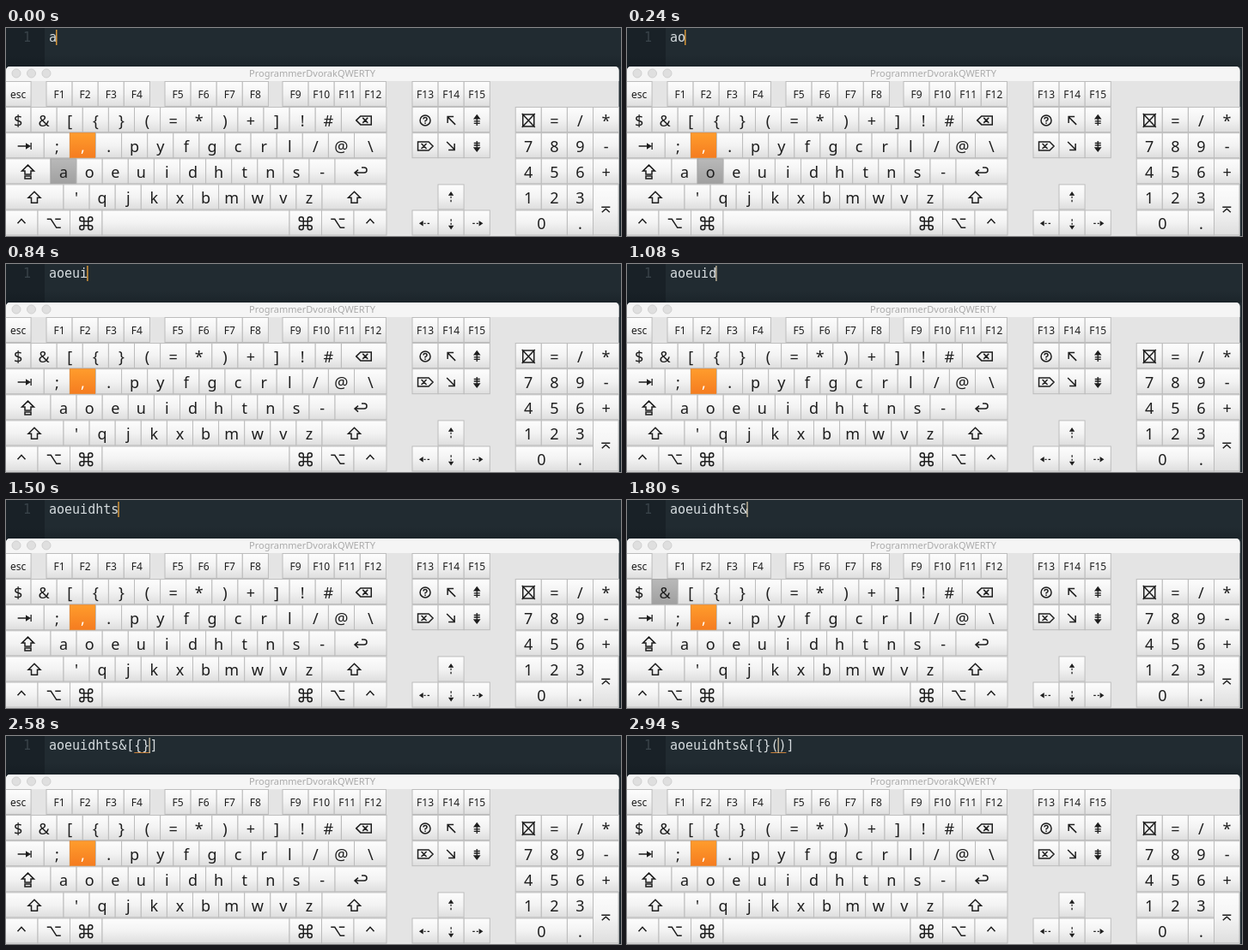
Recreate the animation shown at these times as an HTML page. Size 716x243 px, loop 3000 ms.

```html
<!DOCTYPE html>
<html>
<head>
<meta charset="utf-8">
<style>
html, body { margin: 0; width: 716px; height: 243px; overflow: hidden; background: #212b31; }
svg { display: block; }
text { font-family: "Noto Sans", "Open Sans", sans-serif; }
.code text { font: 15px "DejaVu Sans Mono", monospace; white-space: pre; }
.key rect { fill: url(#cap); stroke: #bcbcbc; stroke-width: 1; }
.key text { font-size: 18px; text-anchor: middle; fill: #1e1e1e; }
.key .small { font-size: 12px; }
.key path { fill: none; stroke: #1e1e1e; stroke-width: 1.5; }
.key .solid { fill: #1e1e1e; stroke-width: 1.3; }
.key.down rect { fill: url(#held); stroke: #a2a2a2; }
.key.dead rect { fill: url(#orange); stroke: #e58a35; }
.key.dead text { fill: #fff; }
</style>
</head>
<body>
<svg width="716" height="243">
  <defs>
    <linearGradient id="cap" x2="0" y2="1"><stop stop-color="#fdfdfd"/><stop offset=".5" stop-color="#f3f3f3"/><stop offset="1" stop-color="#dedede"/></linearGradient>
    <linearGradient id="held" x2="0" y2="1"><stop stop-color="#b9b9b9"/><stop offset="1" stop-color="#a0a0a0"/></linearGradient>
    <linearGradient id="orange" x2="0" y2="1"><stop stop-color="#ff9c2c"/><stop offset="1" stop-color="#f57c20"/></linearGradient>
    <linearGradient id="shade" x2="0" y2="1"><stop stop-color="#10171c" stop-opacity="0"/><stop offset="1" stop-color="#10171c" stop-opacity=".35"/></linearGradient>
  </defs>
  <g class="code">
    <rect width="716" height="243" fill="#212b31"/>
    <rect width="45" height="243" fill="#192127"/>
    <text x="20" y="16" fill="#39434a">1</text>
    <text id="line" x="50" y="16" fill="#d6dcdf"></text>
    <path id="match" stroke="#c8813a"/>
    <rect id="caret" y="2" width="1.3" height="18"/>
    <rect y="32" width="716" height="13" fill="url(#shade)"/>
  </g>
  <path d="M0 243V50Q0 45 5 45H708.5Q713.5 45 713.5 50V243Z" fill="#e4e4e4"/>
  <path d="M0 62V50Q0 45 5 45H708.5Q713.5 45 713.5 50V62Z" fill="#f5f5f5"/>
  <g fill="#dfdfdf" stroke="#d0d0d0"><circle cx="12" cy="53" r="5"/><circle cx="29.5" cy="53" r="5"/><circle cx="47" cy="53" r="5"/></g>
  <text x="356.5" y="57" font-size="11" text-anchor="middle" fill="#aaa">ProgrammerDvorakQWERTY</text>
  <g id="board"></g>
</svg>
<script>
const $ = id => document.getElementById(id);
const PITCH = 30.1, ADVANCE = 15 * 0.602;

// Icon outlines around the centre of a key; a leading * means filled.
const icons = {
  shift: 'M0-7L7 0H3.5V6H-3.5V0H-7Z',
  caps: 'M0-8L7-1H3.5V3H-3.5V-1H-7ZM-3.5 5H3.5V8H-3.5Z',
  back: 'M-9 0L-4-5H8.5V5H-4ZM-1.5-3L4.5 3M4.5-3L-1.5 3',
  del: 'M9 0L4-5H-8.5V5H4ZM1.5-3L-4.5 3M-4.5-3L1.5 3',
  tab: '*M-8 0H3M2-2.5L6 0L2 2.5ZM7.5-4V4',
  ret: 'M-6 1H4Q7 1 7-2T4-5H1M-3-2.5L-7 1L-3 4.5',
  ctrl: 'M-4.5 0L0-5L4.5 0',
  opt: 'M-8-5H-3.5L3 5H8M1.5-5H8',
  cmd: 'M-2.5-5V5A2.5 2.5 0 1 1-5 2.5H5A2.5 2.5 0 1 1 2.5 5V-5A2.5 2.5 0 1 1 5-2.5H-5A2.5 2.5 0 1 1-2.5-5Z',
  help: 'M6 0A6 6 0 1 1-6 0A6 6 0 1 1 6 0M-2-1.5Q-2-3.5 0-3.5T2-1.5Q2-.5 0 .8V1.5M0 2.7V4',
  home: 'M5 5L-4-4M-4 3V-4.5H3',
  end: 'M-5-5L4 4M4-3V4.5H-3',
  pgup: '*M0 6V-2M-3-2L0-6L3-2ZM-3.5 1H3.5M-3.5 3.5H3.5',
  pgdn: '*M0-6V2M-3 2L0 6L3 2ZM-3.5-1H3.5M-3.5-3.5H3.5',
  up: '*M-2-3L0-6L2-3ZM0-1.5V.5M0 2.5V5',
  down: '*M-2 3L0 6L2 3ZM0 1.5V-.5M0-2.5V-5',
  left: '*M-3-2L-6 0L-3 2ZM-1.5 0H.5M2.5 0H5',
  right: '*M3-2L6 0L3 2ZM1.5 0H-.5M-2.5 0H-5',
  clear: 'M-6.5-7H6.5V7H-6.5ZM-7.5-8L7.5 8M7.5-8L-7.5 8',
  enter: 'M-5-4H5M-4.5 2L0-2L4.5 2'
};

function add(parent, tag, attrs, text = '') {
  const node = document.createElementNS('http://www.w3.org/2000/svg', tag);
  for (const name in attrs) node.setAttribute(name, attrs[name]);
  node.textContent = text;
  return parent.appendChild(node);
}

const keys = {};
function key(label, row, x, width = PITCH, height = 29) {
  const y = 62.5 + 30.1 * row, cx = x + width / 2, cy = y + height / 2 + 0.8;
  const group = add($('board'), 'g', { class: 'key' });
  add(group, 'rect', { x, y, width, height });
  if (icons[label]) {
    const solid = label in icons && icons[label][0] === '*';
    add(group, 'path', {
      d: icons[label].replace('*', ''), class: solid ? 'solid' : '',
      transform: `translate(${cx} ${cy})`
    });
  } else {
    const small = row === 0;
    add(group, 'text', { x: cx, y: y + (small ? 19 : 22), class: small ? 'small' : '' }, label);
  }
  keys[label] ??= group;
}

function run(labels, row, x) {
  labels.split(' ').forEach((label, i) => key(label, row, x + i * PITCH));
}

run('esc', 0, -1);
run('F1 F2 F3 F4', 0, 47);
run('F5 F6 F7 F8', 0, 185);
run('F9 F10 F11 F12', 0, 322);
run('F13 F14 F15', 0, 473);

run('$ & [ { } ( = * ) + ] ! #', 1, -1);
key('back', 1, 390.5, 52.5);
key('tab', 2, -1, 45.3);
run('; , . p y f g c r l / @', 2, 44.3);
key('\\', 2, 405.5, 37.5);
key('caps', 3, -1, 53);
run('a o e u i d h t n s -', 3, 52);
key('ret', 3, 383, 60);
key('shift', 4, -1, 68);
run("' q j k x b m w v z", 4, 67);
key('shift', 4, 368, 75);
const bottom = ['ctrl', 'opt', 'cmd', '', 'cmd', 'opt', 'ctrl'];
const edges = [-1, 37, 74.5, 112, 330, 367.5, 405, 443];
bottom.forEach((label, i) => key(label, 5, edges[i], edges[i + 1] - edges[i]));

run('help home pgup', 1, 473);
run('del end pgdn', 2, 473);
run('up', 4, 503);
run('left down right', 5, 473);

run('clear = / *', 1, 593.2);
run('7 8 9 -', 2, 593.2);
run('4 5 6 +', 3, 593.2);
run('1 2 3', 4, 593.2);
key('enter', 4, 683.5, 29.6, 59);
key('0', 5, 593.2, 60.2);
key('.', 5, 653.4);
keys[','].classList.add('dead');

// Time, key, and the auto-closed brackets to the right of the caret.
const strokes = [
  [0, 'a'], [180, 'o'], [300, 'e'], [420, 'u'], [660, 'i'], [900, 'd'],
  [1140, 'h'], [1260, 't'], [1380, 's'], [1740, '&'],
  [1920, '[', ']'], [2100, '{', '}]'], [2460, '}', ']'], [2760, '(', ')]']
];
const HOLD = 120;
let held;

function draw(now) {
  const t = now % 3000;
  const typed = strokes.filter(s => s[0] <= t);
  const [since, label, tail = ''] = typed[typed.length - 1];
  const head = typed.map(s => s[1]).join('');
  const caretX = 50 + head.length * ADVANCE;

  $('line').textContent = head + tail;
  $('caret').setAttribute('x', caretX - 0.9);
  $('caret').setAttribute('fill', tail || 'd&'.includes(label) ? '#d3c3a6' : '#f0a63c');

  const from = caretX - (label === '}' ? 2 : 1) * ADVANCE;
  $('match').setAttribute('d', tail ? `M${from} 19.5h${2 * ADVANCE}` : '');

  held?.classList.remove('down');
  held = t < since + HOLD ? keys[label] : null;
  held?.classList.add('down');
}

const start = performance.now();
function tick() {
  draw(performance.now() - start);
  requestAnimationFrame(tick);
}
tick();
</script>
</body>
</html>
```
